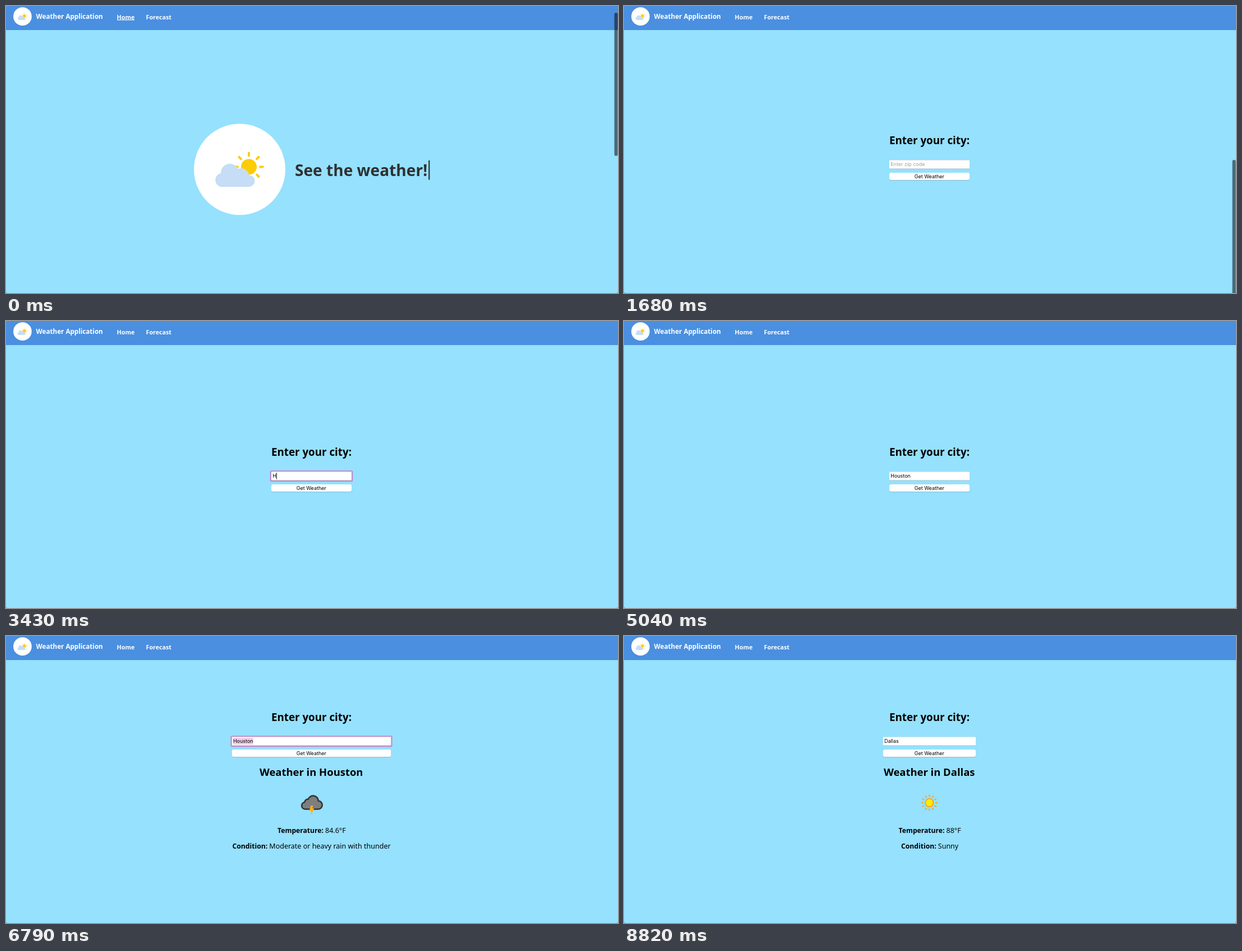
Animation of 1091x513 px, one loop 9870 ms. Source, as an HTML page:

```html
<!DOCTYPE html>
<html lang="en">
<head>
<meta charset="utf-8">
<title>Weather Application</title>
<style>
  html, body { margin: 0; width: 100%; height: 100%; overflow: hidden; background: #95e1fe; }
  svg { display: block; width: 100%; height: 100%; }
  text { font-family: "Noto Sans", "Open Sans", sans-serif; white-space: pre; }
  .b { font-weight: 700; }
  .nav { font-weight: 600; font-size: 10.7px; fill: #fff; }
  .mid { text-anchor: middle; }
  .end { text-anchor: end; }
  .ui { font: 9px Inter, Roboto, sans-serif; }
</style>
</head>
<body>
<svg viewBox="0 0 1091 513" preserveAspectRatio="none">
  <defs>
    <g id="badge">
      <circle r="81.5" fill="#fff"/>
      <circle cx="16.5" cy="-4.5" r="14" fill="#fdcc05"/>
      <g id="rays" stroke="#fdcc05" stroke-width="4" stroke-linecap="round"></g>
      <g fill="#c5ddf5">
        <circle cx="-31" cy="19" r="12.3"/>
        <circle cx="-17.5" cy="6" r="16"/>
        <circle cx="2.5" cy="12" r="14"/>
        <circle cx="16.5" cy="20.7" r="10.5"/>
        <rect x="-31" y="11" width="47.5" height="20.2"/>
      </g>
    </g>
  </defs>

  <rect width="1091" height="513" fill="#466069"/>
  <rect width="1091" height="513" rx="2" fill="#95e1fe"/>
  <path d="M0 43V2Q0 0 2 0H1089Q1091 0 1091 2V43Z" fill="#4a8fe0"/>
  <use href="#badge" transform="translate(29.4 18.7) scale(.201)"/>
  <text class="b" x="53.6" y="22.7" font-size="11.65" fill="#fff">Weather Application</text>
  <text class="nav" x="197.6" y="23.6">Home</text>
  <text class="nav" x="249.6" y="23.6">Forecast</text>
  <rect id="line" y="24.4" height="1.1" fill="#fff"/>

  <g id="hero">
    <use href="#badge" transform="translate(416.5 292)"/>
    <text id="slogan" class="b" x="515" y="303.5" font-size="28.1" fill="#2f3031"></text>
    <rect id="bar" y="276" width="2.2" height="34.5" fill="#2f3031"/>
  </g>

  <g id="page">
    <g id="form">
      <text class="b mid" x="544.5" y="241" font-size="18.77">Enter your city:</text>
      <rect id="ring" y="267.3" height="20" rx="2.5" fill="#c58cc6"/>
      <rect id="edge" y="269" height="16.2" fill="#9fb4bd"/>
      <rect id="box" y="269.4" height="15.1" fill="#fff"/>
      <rect id="mark" y="271" height="12" fill="#efcdea"/>
      <text id="value" class="ui" y="280.4"></text>
      <rect id="caret" y="271.3" width=".9" height="11.4"/>
      <rect id="shade" y="292.5" height="13.2" rx="3" fill="#86aab9"/>
      <rect id="button" y="292" height="12.9" rx="3"/>
      <text class="ui mid" x="544.3" y="301.7">Get Weather</text>
    </g>
    <g id="result">
      <text id="title" class="b mid" x="544.2" y="250.3" font-size="18.45"></text>
      <g id="storm">
        <path d="M533 309.5a6.3 6.3 0 0 1 -.6 -12.5a6 6 0 0 1 6.4 -5.4a9.3 9.3 0 0 1 18 3.2a7.3 7.3 0 0 1 -.8 14.7z"
              fill="#7e7e7e" stroke="#343434" stroke-width="2.6" stroke-linejoin="round"/>
        <path d="M543.5 303h4l-1.5 5h3.2l-5.7 13l1-8.2h-4z" fill="#fdae1d"/>
      </g>
      <g id="sun" transform="translate(544.4 298)">
        <circle r="7.2" fill="#fdec00" stroke="#f9a51f" stroke-width="2"/>
        <g id="beams" stroke="#f6a52b" stroke-width="2.1"></g>
      </g>
      <text id="tempKey" class="b end" y="351.7" font-size="12.15">Temperature:</text>
      <text id="temp" y="351.7" font-size="12.5"></text>
      <text id="condKey" class="b end" y="379.5" font-size="12.2">Condition:</text>
      <text id="cond" y="379.5" font-size="12.5"></text>
    </g>
  </g>
  <rect id="thumb" x="1084.5" width="6" rx="3"/>
</svg>
<script>
const LOOP = 9870, STEP = 70;
const el = {};
document.querySelectorAll('[id]').forEach(e => el[e.id] = e);
const set = (id, attrs) => { for (const k in attrs) el[id].setAttribute(k, attrs[k]); };
const show = (id, on) => set(id, { visibility: on ? 'inherit' : 'hidden' });
const write = (id, s) => { if (el[id].textContent !== s) el[id].textContent = s; };
const within = (t, a, b) => t >= a && t < b;

function spokes(id, n, r1, r2, cx = 0, cy = 0) {
  let s = '';
  for (let i = 0; i < n; i++) {
    const a = i / n * 2 * Math.PI, c = Math.cos(a), d = Math.sin(a);
    s += `<path d="M${cx + r1 * c} ${cy + r1 * d}L${cx + r2 * c} ${cy + r2 * d}"/>`;
  }
  el[id].innerHTML = s;
}
spokes('rays', 8, 20, 24.8, 16.5, -4.5);
spokes('beams', 12, 10.6, 14.4);

const keys = {
  Houston: [3430, 3710, 3780, 3920, 4060, 4130, 4200],
  Dallas: [7140, 7350, 7490, 7630, 7700, 7840]
};
const houston = { city: 'Houston', temp: '84.6°F', cond: 'Moderate or heavy rain with thunder',
  left: 402.7, width: 283.6, tempX: 569, condX: 469.3 };
const dallas = { city: 'Dallas', temp: '88°F', cond: 'Sunny',
  left: 461.8, width: 165.2, tempX: 574.5, condX: 559.8 };
const empty = { left: 473, width: 143 };

function drawHero(t) {
  write('slogan', t < 560 ? 'See the weather!' : 'See the weather');
  set('bar', { x: 517 + el.slogan.getComputedTextLength() });
  show('bar', !within(t, 280, 350));
}

function drawForm(t, data, shift) {
  const { left: x, width } = data;
  set('form', { transform: `translate(0 ${shift})` });
  for (const id of ['edge', 'box', 'shade', 'button']) set(id, { x, width });
  set('ring', { x: x - 2.3, width: width + 4.6 });

  const city = t < 7140 ? 'Houston' : 'Dallas';
  const typed = city.slice(0, keys[city].filter(k => k <= t).length);
  write('value', typed || 'Enter zip code');
  set('value', { x: x + 2.2, fill: typed ? '#000' : '#a3a3a3' });
  const end = x + 2.2 + (typed ? el.value.getComputedTextLength() : 0);

  const focus = within(t, 2870, 4760) || within(t, 6650, 8400);
  const marked = within(t, 6790, 7140);
  show('ring', focus);
  show('mark', marked);
  set('mark', { x: x + 2, width: end - x - 2 });
  show('caret', focus && !marked);
  set('caret', { x: end });
  const pressed = within(t, 4760, 4970) || within(t, 8400, 8610);
  set('button', { fill: pressed ? '#f0f0f0' : '#fff' });
}

function drawResult(data) {
  show('result', !!data.city);
  if (!data.city) return;
  write('title', 'Weather in ' + data.city);
  write('temp', data.temp);
  write('cond', data.cond);
  set('temp', { x: data.tempX });
  set('tempKey', { x: data.tempX - 3 });
  set('cond', { x: data.condX });
  set('condKey', { x: data.condX - 3 });
  show('storm', data === houston);
  show('sun', data === dallas);
}

function draw(ms) {
  const t = Math.floor(ms / STEP) * STEP;
  const home = t < 840;
  show('hero', home);
  show('page', !home);
  show('line', t < 280 || within(t, 350, 1260));
  set('line', t < 280 ? { x: 198, width: 31 } : { x: 250, width: 45.3 });

  const at = within(t, 1960, 2100) ? 1960 : t;
  const p = Math.min(1, Math.max(0, (at - 1610) / 490));
  const scroll = 1 - (1 - p) ** 2;
  const fade = Math.min(1, Math.max(0, 1 - (t - 3010) / 420));
  set('thumb', { y: home ? 12 : 274 + 4 * scroll, height: home ? 256 : 250, 'fill-opacity': .52 * fade });

  if (home) return drawHero(t);
  const data = t < 5390 ? empty : t < 8820 ? houston : dallas;
  drawForm(t, data, data === empty ? 8.3 * (1 - scroll) : -89);
  drawResult(data);
}

function tick() {
  draw(performance.now() % LOOP);
  requestAnimationFrame(tick);
}
tick();
</script>
</body>
</html>
```
